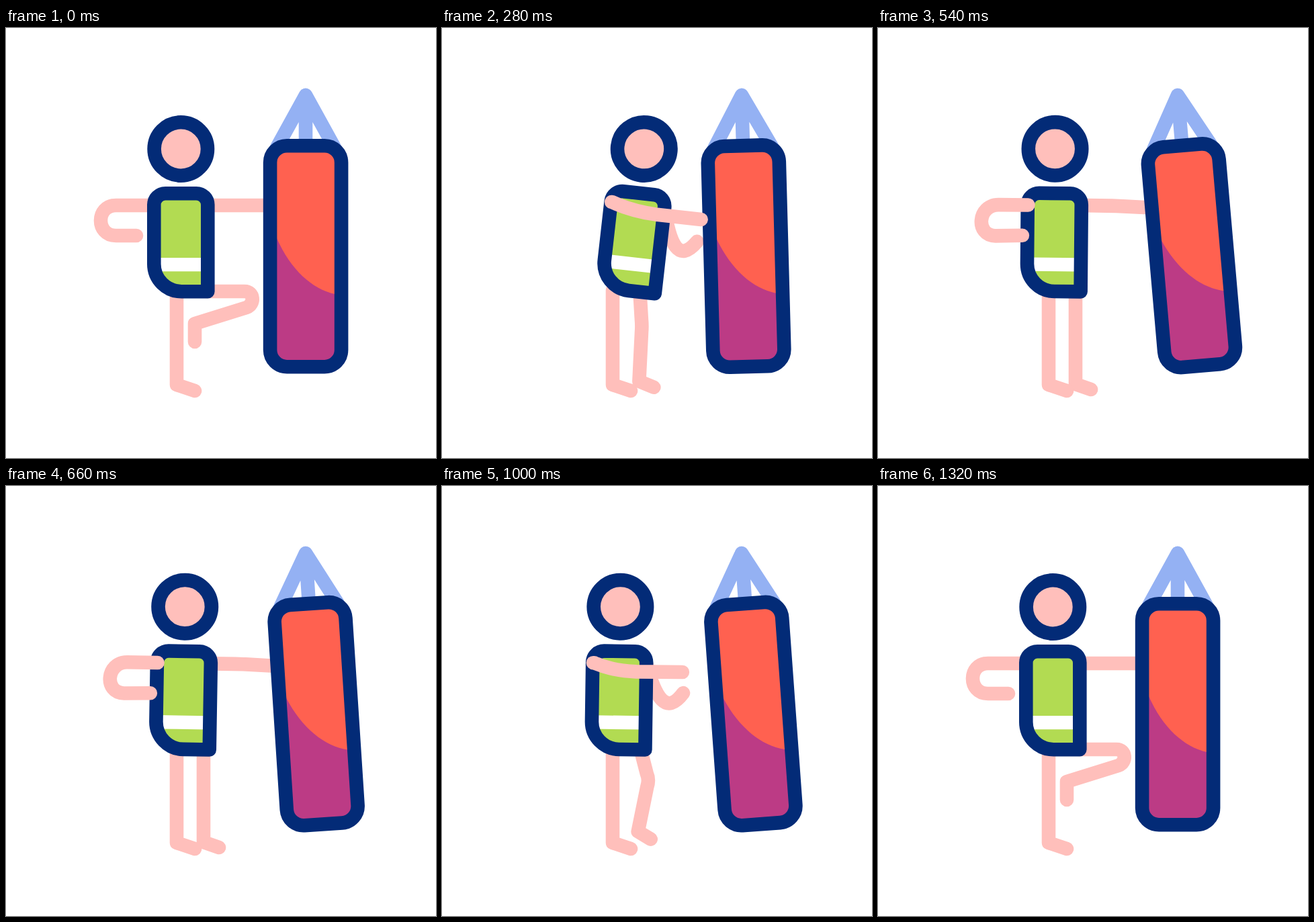
Write an HTML page that moves like this. It is 640x640 px and loops after 2400 ms.

```html
<!DOCTYPE html>
<html lang="en">
<head>
<meta charset="utf-8">
<title>Boxing workout</title>
<style>
  html, body { margin: 0; width: 100%; height: 100%; overflow: hidden; background: #fff; }
  svg { display: block; width: 100%; height: 100%; }
  .limb, .rope, .edge { fill: none; stroke-width: 20.6; stroke-linecap: round; stroke-linejoin: round; }
  .limb { stroke: #ffbfbb; }
  .rope { stroke: #94b1f3; }
  .edge { stroke: #032b77; }
</style>
</head>
<body>
<svg viewBox="0 0 640 640">
  <defs>
    <path id="shirt" d="M237.3 246.2H283.3A17 17 0 0 1 300.3 263V392.2H261.3A41 41 0 0 1 220.3 351V263A17 17 0 0 1 237.3 246.2Z"/>
  </defs>
  <g id="behind"><path id="backArm" class="limb"/></g>
  <path id="leg" class="limb"/>
  <path class="limb" d="M254 390V531L281 540"/>
  <g id="bag">
    <path class="rope" d="M403 178L446 100L489 178M446 100V178"/>
    <rect x="393" y="175" width="106" height="329" rx="25" fill="#bc3b85"/>
    <path fill="#ff6150" d="M394 292L403 313C424 360 455 388 489 396L498 397V200Q498 176 474 176H418Q394 176 394 200Z"/>
    <rect class="edge" x="393.1" y="175.2" width="106" height="329" rx="25"/>
  </g>
  <g id="body">
    <path id="frontArm" class="limb"/>
    <g id="torso">
      <circle class="edge" cx="260.3" cy="180" r="39.7" style="fill:#ffbfbb"/>
      <use href="#shirt" fill="#b2db52"/>
      <path fill="#fff" d="M224 342H298V362.3H224Z"/>
      <use href="#shirt" class="edge"/>
    </g>
  </g>
</svg>
<script>
const LOOP = 2400, ACTIVE = 1320, STEP = 20;
const HITS = [0, 315, 600, 937, 1270];
const el = id => document.getElementById(id);

// Limb poses: rest, the pose steered through, and the far end
const frontArm = [
  [163.5, 264, 133.5, 264, 133.5, 309, 163.5, 309, 194, 309],
  [231, 264, 192, 266, 173, 317, 205, 318, 284, 313],
  [222, 264, 235, 268, 255, 273, 290, 274, 358, 274]
];
const backArm = [
  [330, 264, 360, 264, 392, 264],
  [327, 258, 344, 258, 406, 272],
  [314, 318, 330, 346, 353, 309]
];
const legDown = [294, 390, 294, 435, 294, 442, 294, 448, 294, 455, 294, 530, 317, 538];
const legUp = [300, 392, 355, 392, 369, 392, 371, 411, 358, 416, 281, 440, 281, 467];

const mix = (a, b, u) => a.map((v, i) => v + (b[i] - v) * u);
const sweep = ([a, b, c], u) => mix(mix(a, b, u), mix(b, c, u), u);

// Smooth step from 0 to 1 between two times
function ease(t, from, to) {
  const u = Math.min(1, Math.max(0, (t - from) / (to - from)));
  return (1 - Math.cos(Math.PI * u)) / 2;
}
const pulse = (t, a, b, c, d) => ease(t, a, b) - ease(t, c, d);

// Each hit sends the bag out and back once
function swing(t) {
  const i = HITS.findIndex(h => h > t);
  if (i < 0) return 0;
  const u = (t - HITS[i - 1]) / (HITS[i] - HITS[i - 1]);
  return 13.2 * Math.sin(Math.PI * u) ** 2;
}

function draw(t) {
  const lean = 6.45 * (pulse(t, 0, 290, 315, 590) + pulse(t, 600, 840, 850, 1045));
  const punch = pulse(t, 0, 300, 315, 600) + pulse(t, 600, 900, 970, 1260);
  const lift = 1 - pulse(t, 0, 325, 930, 1185);

  const turn = (id, angle, pivot) => el(id).setAttribute("transform", `rotate(${angle} ${pivot})`);
  turn("bag", -swing(t), "446 100");
  turn("body", lean, "281 540");
  turn("behind", lean, "281 540");

  const f = sweep(frontArm, punch), g = mix(legDown, legUp, lift);
  el("frontArm").setAttribute("d", `M221 264L${f.slice(0, 2)}C${f.slice(2, 8)}L${f.slice(8)}`);
  el("backArm").setAttribute("d", `M300 264C${sweep(backArm, punch)}`);
  el("leg").setAttribute("d", `M${g.slice(0, 2)}L${g.slice(2, 4)}C${g.slice(4, 10)}L${g.slice(10)}`);

  // The resting arm sits behind the torso, the working one in front
  const moving = t >= STEP && t < ACTIVE;
  const top = el(moving ? "frontArm" : "torso");
  if (el("body").lastElementChild !== top) el("body").append(top);
}

const start = performance.now();
function frame() {
  const t = (performance.now() - start) % LOOP;
  draw(Math.floor(t / STEP) * STEP);
  requestAnimationFrame(frame);
}
frame();
</script>
</body>
</html>
```
